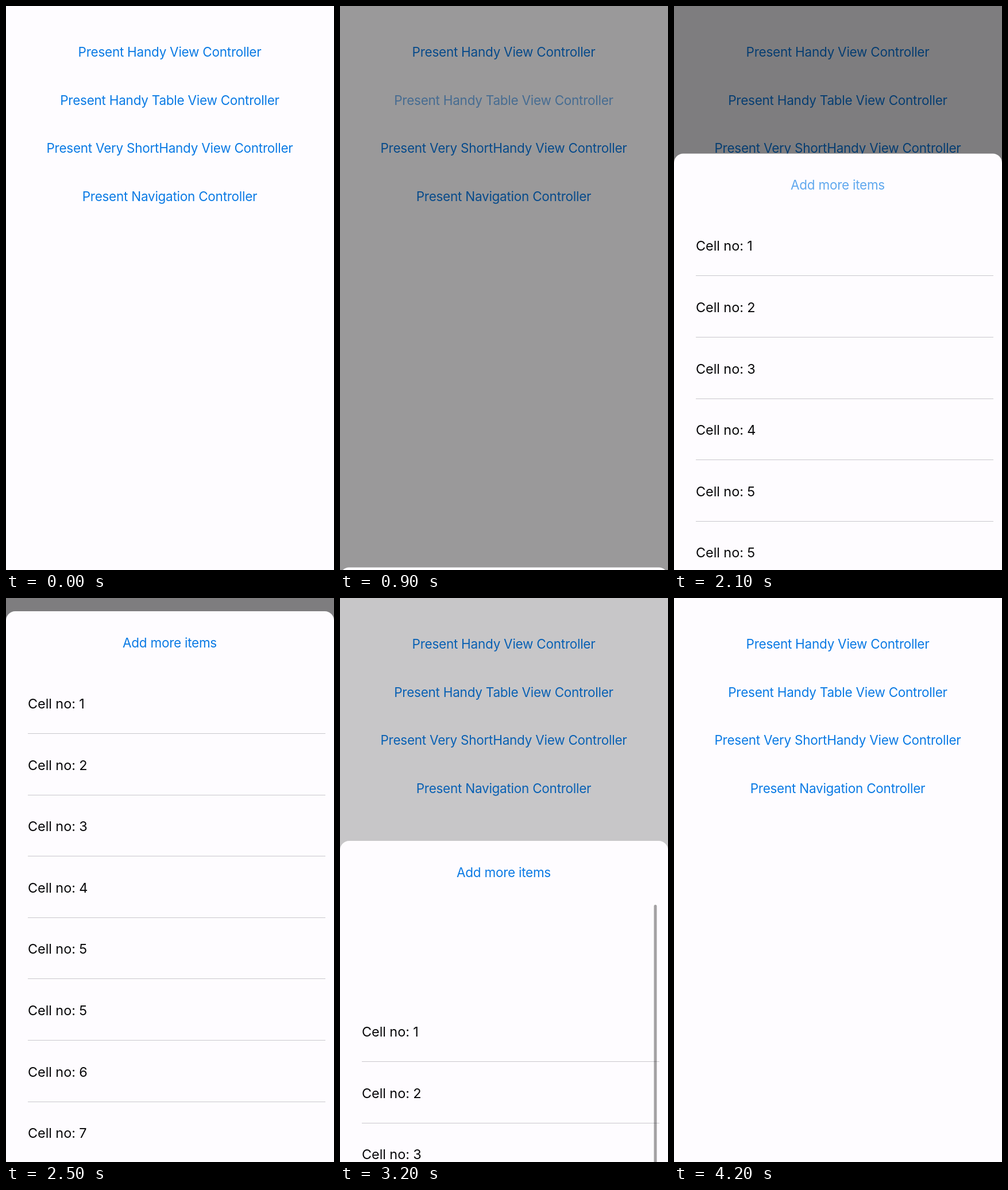
An HTML page with a canvas for the animation above (4500 ms loop, 571x980 px).

```html
<!DOCTYPE html>
<html lang="en">
<head>
<meta charset="utf-8">
<title>Bottom sheet</title>
<style>
  html, body { margin: 0; width: 100%; height: 100%; overflow: hidden; background: #fefcff; }
  canvas { display: block; }
</style>
</head>
<body>
<canvas id="stage" width="571" height="980"></canvas>
<script>
const W = 571, H = 980, LOOP = 4500, STEP = 100;
const PAPER = '#fefcff', BLUE = '#0a7ae4', INK = '#08080a', LINE = '#c9c8cd';
const BUTTONS = [
  'Present Handy View Controller',
  'Present Handy Table View Controller',
  'Present Very ShortHandy View Controller',
  'Present Navigation Controller'
];
const CELLS = [1, 2, 3, 4, 5, 5, 6, 7, 8];
const FIRST_CELLS = 5;
const ROW = 106.6, HEADER = 106, CENTER = 285;
const HIDDEN = 1317, SHORT = 337, TALL = 23;

const ctx = document.getElementById('stage').getContext('2d');

const clamp = u => Math.max(0, Math.min(1, u));
const mix = (a, b, u) => a + (b - a) * u;

// Sine-shaped ease in and out
const ease = (t, start, length) => (1 - Math.cos(Math.PI * clamp((t - start) / length))) / 2;

// Piecewise linear track of [time, value] points
function track(t, points) {
  const next = points.findIndex(p => p[0] > t);
  if (next < 0) return points[points.length - 1][1];
  if (next === 0) return points[0][1];
  const [t0, v0] = points[next - 1], [t1, v1] = points[next];
  return mix(v0, v1, (t - t0) / (t1 - t0));
}

// A touched button drops to 20 % and fades back once released
function touchAlpha(t, down, up) {
  if (t < down) return 1;
  return Math.min(1, 0.2 + 0.8 * Math.max(0, t - up) / 430);
}

function sheetTop(t) {
  if (t < 1900) return mix(HIDDEN, SHORT, ease(t, 699, 500));
  if (t <= 2900) return mix(SHORT, TALL, ease(t, 1931, 500));
  return track(t, [[2900, TALL], [3000, 78], [3100, 228], [3200, 422],
                   [3300, 680], [3400, 890], [3500, 990]]);
}

function dimming(t) {
  if (t <= 2900) return 0.5 * ease(t, 690, 300);
  return track(t, [[2900, 0.5], [3000, 0.415], [3200, 0.215], [3300, 0.12], [3400, 0.04], [3500, 0]]);
}

const overscroll = t =>
  track(t, [[2900, 0], [3000, 73], [3100, 128], [3200, 171], [3350, 120], [3500, 0]]);

function label(text, x, y, { size = 22.5, spacing = -0.25, color = BLUE, align = 'center', alpha = 1 } = {}) {
  ctx.font = `400 ${size}px Inter, Roboto, sans-serif`;
  ctx.letterSpacing = spacing + 'px';
  ctx.textAlign = align;
  ctx.fillStyle = color;
  ctx.globalAlpha = alpha;
  ctx.fillText(text, x, y);
  ctx.globalAlpha = 1;
}

function roundBox(x, y, w, h, radius, color) {
  ctx.fillStyle = color;
  ctx.beginPath();
  ctx.roundRect(x, y, w, h, radius);
  ctx.fill();
}

function drawMenu(t) {
  ctx.fillStyle = PAPER;
  ctx.fillRect(0, 0, W, H);
  BUTTONS.forEach((text, i) =>
    label(text, CENTER, 88 + i * 83.7, { alpha: i === 1 ? touchAlpha(t, 600, 700) : 1 }));
  ctx.fillStyle = `rgba(0, 0, 0, ${dimming(t)})`;
  ctx.fillRect(0, 0, W, H);
}

function drawSheet(t) {
  const top = sheetTop(t);
  if (top >= H) return;
  roundBox(0, top, W, H + 40, 16, PAPER);
  label('Add more items', CENTER, top + 62.5, { alpha: touchAlpha(t, 1800, 1860) });

  const pull = overscroll(t);
  const count = t < 1900 ? FIRST_CELLS : CELLS.length;
  CELLS.slice(0, count).forEach((number, i) => {
    const y = top + HEADER + pull + i * ROW;
    label('Cell no: ' + number, 38, y + 63, { size: 23.5, spacing: -0.1, color: INK, align: 'left' });
    ctx.fillStyle = LINE;
    ctx.fillRect(38, Math.round(y + 106), 518, 1);
  });

  if (t > 2900) roundBox(546.5, top + HEADER + 5, 5, 771 - pull, 2.5, 'rgba(0, 0, 0, 0.36)');
}

function frame(now) {
  const t = Math.floor((now % LOOP) / STEP) * STEP;
  drawMenu(t);
  drawSheet(t);
  requestAnimationFrame(frame);
}
requestAnimationFrame(frame);
</script>
</body>
</html>
```
